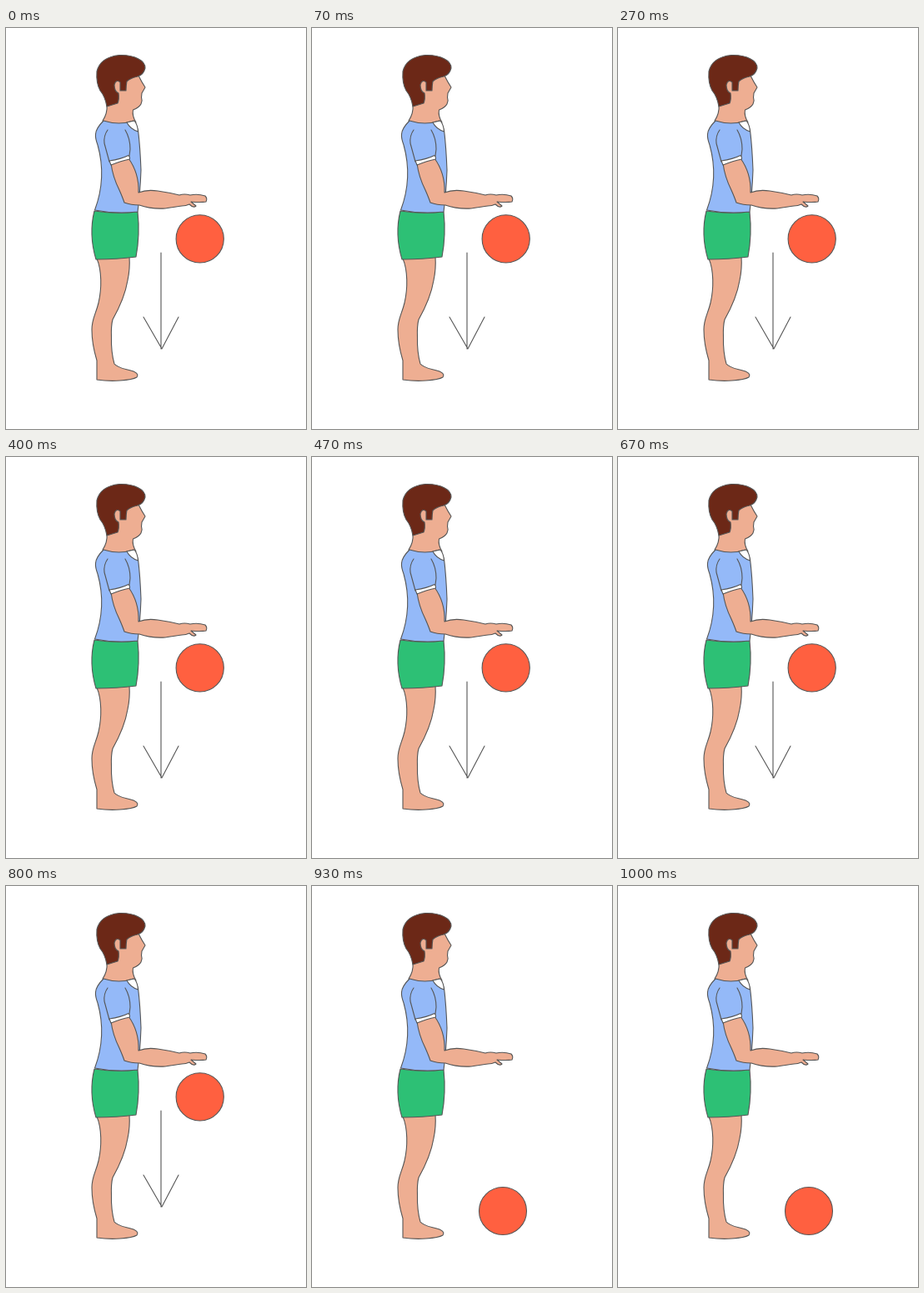
Write an HTML page that moves like this. It is 360x480 px and loops after 1870 ms.

```html
<!DOCTYPE html>
<html lang="en">
<head>
<meta charset="utf-8">
<title>Ball drop</title>
<style>
  html, body { margin: 0; width: 100%; height: 100%; overflow: hidden; background: #fff; }
  svg { display: block; width: 100%; height: 100%; }
  .line { stroke: #555; stroke-width: 1.1; stroke-linejoin: round; stroke-linecap: round; fill: none; }
  .skin { fill: #eeae92; }
  .hair { fill: #6c2817; }
  .shirt { fill: #94b9f8; }
  .shorts { fill: #2dc075; }
  .white { fill: #fff; }
  .ball { fill: #ff6040; }
</style>
</head>
<body>
<svg viewBox="0 0 360 480">
  <!-- leg -->
  <path class="line skin" d="M109 276C115 290 115 312 111 329C108 342 103 348 103 361C103 375 106 388 109 398V421Q123 423 137 422Q152 421 157 418Q160 414 153 411C145 408 135 408 130 402Q126 388 126.500 370Q126 356 128 349C137 333 143 320 146 302Q149 288 148 274"/>
  <!-- shorts -->
  <path class="line shorts" d="M106 219Q99 247 108 277Q133 277 156 274Q161 247 158 220Q132 223 106 219Z"/>
  <!-- head and neck -->
  <path class="line skin" d="M121 92Q122 102 116 111Q130 119 156 113Q151 105 152.500 98Q160 95 162 91Q164 87 162.500 83L163 78L167 71Q163 65 159 57L125 57Z"/>
  <path class="line hair" d="M121 94Q119 82 113 75Q108 66 109 52Q113 35 136 32.500Q150 32 159 37Q167 41 167 48Q165 56 158 58Q149 60 145 64Q144 69 144 75H137V65Q132 61 130 68Q130 76 135 78Q136 85 134 90Z"/>
  <!-- shirt -->
  <path class="line shirt" d="M117 111Q108 120 107.500 127Q107 132 110 140C117 165 117 190 106.500 218Q132 223 158 220Q161 197 162 170Q161 143 158.500 122L153 111Q136 117 117 111Z"/>
  <path class="line white" d="M145 113L154 111Q158 116 158.500 124Q149 121 145 113Z"/>
  <!-- arm -->
  <path class="line skin" d="M126 162Q128 178 136 194Q140 203 142 209Q150 212 160 212Q174 217 191 216Q204 214 211 213Q216 213 220 211Q225 216 228 213L222 208Q233 209 240 208Q242 204 239 201Q230 198 221 200Q214 198 208 200Q196 197 182 195Q169 193 159 197Q160 174 147 156Z"/>
  <path class="line" d="M122 122Q117 129 118 138L124 160M143 122Q149 132 149 145L148 153"/>
  <path class="line white" d="M124 159Q138 157 147 152.500Q149 154 148.500 157Q138 159 126 164Z"/>
  <path id="arrow" class="line" d="M186 269V384M165 346L187 384L207 346"/>
  <circle id="ball" class="line ball"/>
</svg>
<script>
  const LOOP = 1870, DROP = 930;
  const ball = document.getElementById('ball');
  const arrow = document.getElementById('arrow');

  function place(cx, cy, r) {
    ball.setAttribute('cx', cx);
    ball.setAttribute('cy', cy);
    ball.setAttribute('r', r);
  }

  function draw() {
    const dropped = performance.now() % LOOP >= DROP;
    if (dropped) place(229, 389, 28.5);
    else place(232.7, 252.4, 28.6);
    arrow.style.visibility = dropped ? 'hidden' : 'visible';
    requestAnimationFrame(draw);
  }
  draw();
</script>
</body>
</html>
```
